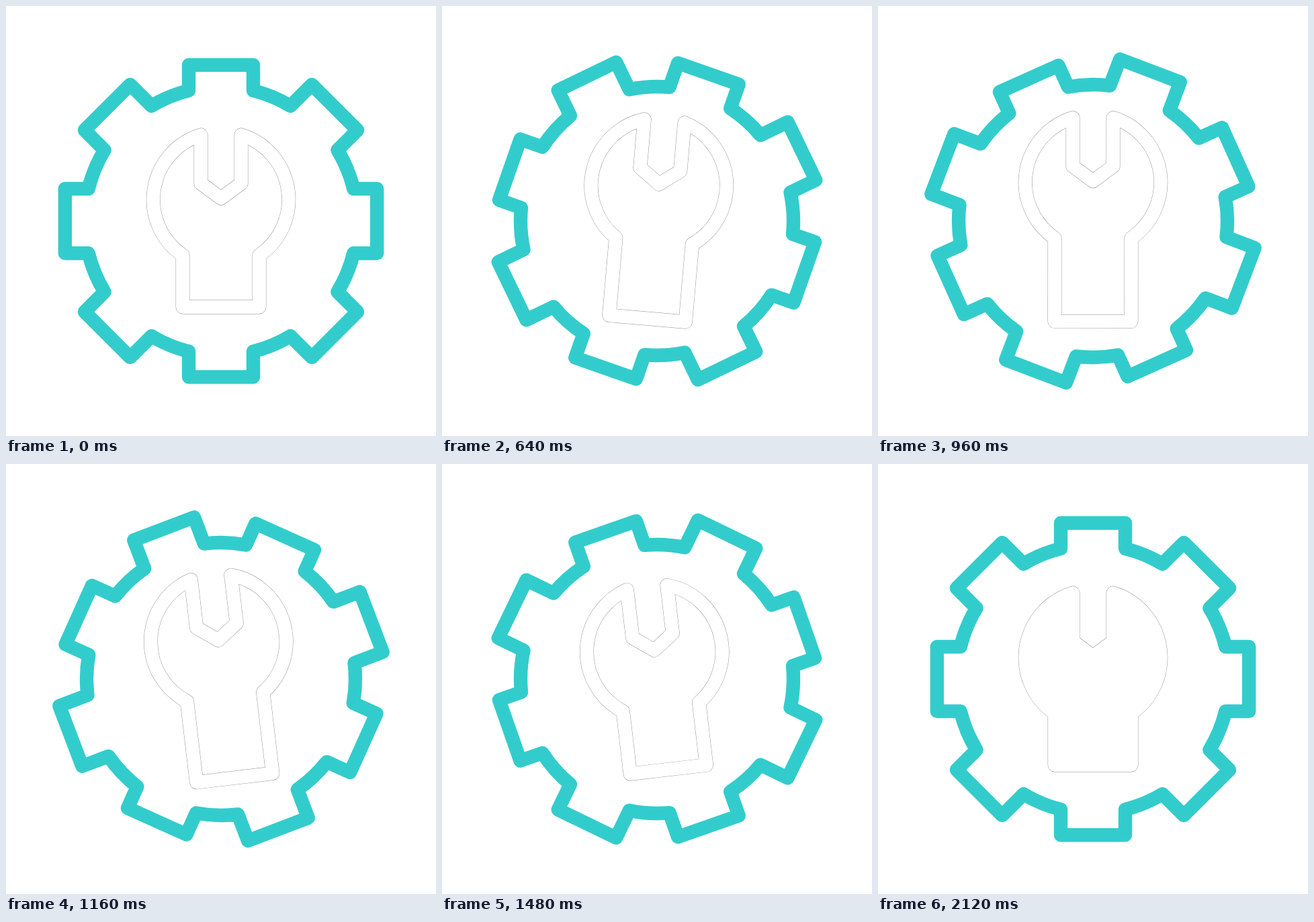
Recreate the animation shown at these times as an HTML page. Size 640x640 px, loop 2160 ms.

```html
<!DOCTYPE html>
<html lang="en">
<head>
<meta charset="utf-8">
<title>Gear and wrench</title>
<style>
  html, body { margin: 0; width: 100%; height: 100%; overflow: hidden; background: #fff; }
  svg { display: block; width: 100vw; height: 100vh; }
  path { fill: none; stroke-linejoin: round; }
</style>
</head>
<body>
<svg viewBox="0 0 640 640">
  <path id="gear" stroke="#33cccc" stroke-width="20.4"/>
  <g id="wrench">
    <path id="edge" stroke="#8c8c8c" stroke-width="20.8"/>
    <path id="body" stroke="#fff" stroke-width="19.9"/>
  </g>
</svg>
<script>
const LOOP = 2160, STEP = 40;
const [gear, wrench, edge, body] =
  ['gear', 'wrench', 'edge', 'body'].map(id => document.getElementById(id));

// Eight teeth; the rim arcs beside the two side teeth are slightly wider.
function gearPath() {
  const half = 48;
  const rim = i => i % 4 >= 2 ? 203 : 200;
  const root = i => Math.sqrt(rim(i) ** 2 - half ** 2);
  let d = '';
  for (let i = 0; i < 8; i++) {
    const a = i * Math.PI / 4, top = i % 2 ? 239.2 : 232.2;
    const at = (x, y) => {
      const px = 320 + x * Math.cos(a) + y * Math.sin(a);
      const py = 320 + x * Math.sin(a) - y * Math.cos(a);
      return px.toFixed(2) + ' ' + py.toFixed(2);
    };
    const arc = r => `A${r} ${r} 0 0 1 `;
    d += (i ? arc(rim(i)) : 'M') + at(-half, root(i)) +
      'L' + at(-half, top) + 'L' + at(half, top) + 'L' + at(half, root(i + 1));
    if (i === 7) d += arc(rim(8)) + (320 - half) + ' ' + (320 - root(0)) + 'Z';
  }
  return d;
}

// The handle grows while the head keeps its shape.
const wrenchPath = stretch => {
  const bottom = (448 + stretch).toFixed(2);
  return `M290 192V264L320 286L350 264V192A100.5 100.5 0 0 1 377 371` +
    `V${bottom}H263V371A100.5 100.5 0 0 1 290 192Z`;
};

// Cubic Bezier easing (.65, 0, .35, 1)
function ease(x) {
  if (x <= 0) return 0;
  if (x >= 1) return 1;
  let lo = 0, hi = 1;
  for (let i = 0; i < 24; i++) {
    const u = (lo + hi) / 2;
    const bx = 3 * u * (1 - u) * (0.65 * (1 - u) + 0.35 * u) + u ** 3;
    if (bx < x) lo = u; else hi = u;
  }
  return lo * lo * (3 - 2 * lo);
}

// Sum of eased moves: [start, end, change]
const track = (t, moves) =>
  moves.reduce((v, [a, b, change]) => v + change * ease((t - a) / (b - a)), 0);

function draw(t) {
  const turn = track(t, [[40, 2080, 180]]);
  const swing = track(t, [[80, 710, 5], [710, 1242, -12], [1320, 2080, 7]]);
  const grow = track(t, [[85, 940, 1], [940, 1915, -1]]);
  gear.setAttribute('transform', `rotate(${turn} 320 320)`);
  wrench.setAttribute('transform',
    `translate(0 ${-25.5 * grow}) rotate(${swing} 320 320)`);
  const d = wrenchPath(47 * grow);
  edge.setAttribute('d', d);
  body.setAttribute('d', d);
  const solid = t >= 80 && t < 480 || t >= 1800;
  body.style.fill = solid ? '#fff' : 'none';
}

gear.setAttribute('d', gearPath());
const start = performance.now();
function tick() {
  const t = (performance.now() - start) % LOOP;
  draw(Math.floor(t / STEP) * STEP);
  requestAnimationFrame(tick);
}
tick();
</script>
</body>
</html>
```
